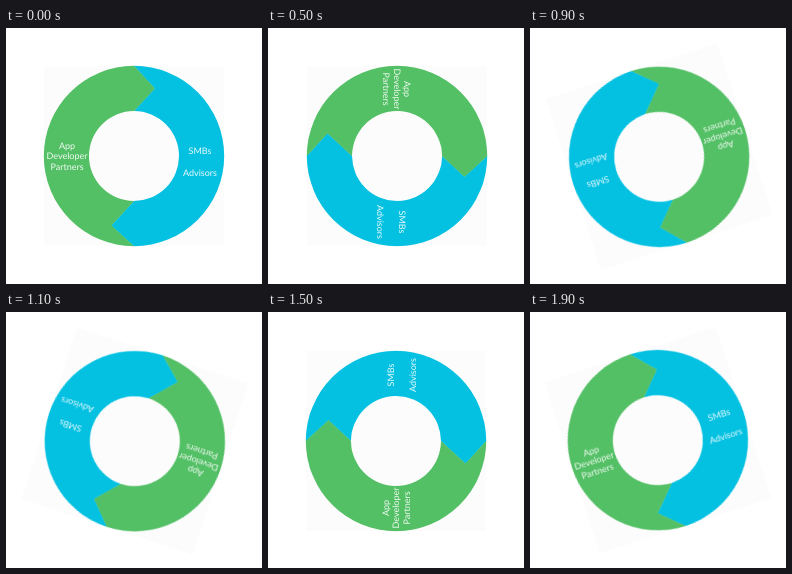
An HTML page for the animation above (2 s loop, 256 by 256 pixels).

```html
<!DOCTYPE html>
<html lang="en">
<head>
<meta charset="utf-8">
<title>Partner cycle</title>
<style>
  html, body { margin: 0; width: 100%; height: 100%; overflow: hidden; background: #fff; }
  svg { display: block; width: 100vw; height: 100vh; }
  #wheel {
    transform-origin: 128.5px 128.5px;
    animation: turn 2000ms steps(20, end) infinite;
  }
  @keyframes turn {
    from { transform: rotate(0deg); }
    to { transform: rotate(360deg); }
  }
  .card { fill: #fcfcfc; }
  .green { fill: #54c066; }
  .blue { fill: #04c1e2; }
  .seam { fill: none; stroke: #2cc1a4; stroke-width: .8; }
  text {
    font: 400 9px Lato, sans-serif;
    fill: #fff;
    fill-opacity: .92;
    text-anchor: middle;
    text-rendering: geometricPrecision;
  }
</style>
</head>
<body>
<svg viewBox="0 0 256 256">
  <g id="wheel">
    <rect class="card" x="38" y="38" width="180" height="180"/>
    <!-- the seam closes the hairline gap between the two half rings -->
    <path class="seam" d="M128 38.2 L148.8 60.5 L128 82.6 M128 217.8 L105.4 197.5 L128 173.4"/>
    <path class="blue" d="M128 37.8 A90.2 90.2 0 0 1 128 218.2 L105.4 197.5 L128 173 A45 45 0 0 0 128 83 L148.8 60.5 Z"/>
    <path class="green" d="M128 37.8 A90.2 90.2 0 0 0 128 218.2 L105.4 197.5 L128 173 A45 45 0 0 1 128 83 L148.8 60.5 Z"/>
    <text x="61" y="120.5">App</text>
    <text x="61" y="131.2">Developer</text>
    <text x="61" y="142">Partners</text>
    <text x="194" y="126.4">SMBs</text>
    <text x="194" y="147.6">Advisors</text>
  </g>
</svg>
</body>
</html>
```
